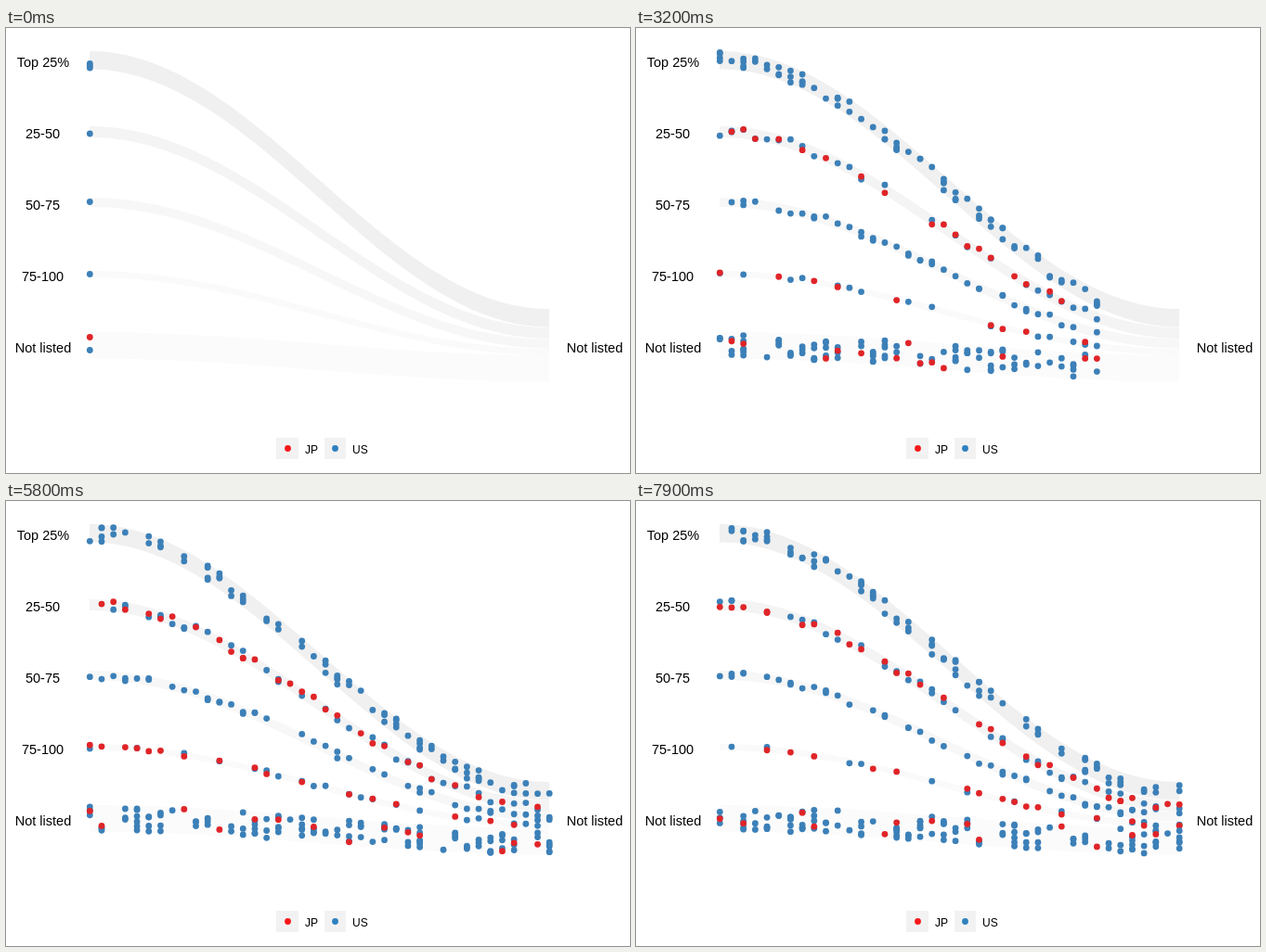
An HTML page with a canvas that plays this animation: 672 px wide and 480 px high, repeating every 8000 ms.

```html
<!DOCTYPE html>
<html lang="en">
<head>
<meta charset="utf-8">
<title>Flow between groups</title>
<style>
  html, body { margin: 0; width: 100%; height: 100%; overflow: hidden; background: #fff; }
  canvas, svg { position: absolute; left: 0; top: 0; width: 672px; height: 480px; }
  text { font-family: "Liberation Sans", Arial, sans-serif; font-size: 14.5px; fill: #000; }
  .row { text-anchor: middle; }
  .key { font-size: 12px; }
</style>
</head>
<body>
<canvas id="stage" width="672" height="480"></canvas>
<svg viewBox="0 0 672 480">
  <text class="row" x="40" y="42">Top 25%</text>
  <text class="row" x="39.5" y="119">25-50</text>
  <text class="row" x="39.5" y="196">50-75</text>
  <text class="row" x="39.5" y="273">75-100</text>
  <text class="row" x="40" y="350">Not listed</text>
  <text class="row" x="634" y="350">Not listed</text>
  <rect x="291" y="442" width="24" height="23" fill="#f2f2f2"/>
  <rect x="343" y="442" width="23" height="23" fill="#f2f2f2"/>
  <circle cx="303.5" cy="453.5" r="3.4" fill="#f8181a"/>
  <circle cx="354.5" cy="453.5" r="3.4" fill="#2f80bf"/>
  <text class="key" x="322" y="459">JP</text>
  <text class="key" x="373" y="459">US</text>
</svg>
<script>
const ctx = document.getElementById('stage').getContext('2d');
const LEFT = 90.3, RIGHT = 585.2, LAST = 39;
const STEP = 100, STEPS = 80;
const RED = '#e02428', BLUE = '#3c80b8';

// y, end: top edge at the left and right; h: thickness
// us, jp: mean number of new dots per step; first: heights of the opening blue dots
const bands = [
  { y: 25, end: 303, h: 19.5, fill: '#f0f0f0', us: 2.1, jp: 0, first: [38.5, 41, 43] },
  { y: 106, end: 323, h: 12, fill: '#f4f4f4', us: 0.8, jp: 0.65, first: [114] },
  { y: 183, end: 335.5, h: 10, fill: '#f7f7f7', us: 1.2, jp: 0, first: [187.5] },
  { y: 262, end: 346, h: 7, fill: '#fafafa', us: 0.4, jp: 0.33, first: [265.5] },
  { y: 328, end: 353, h: 28.5, fill: '#fbfbfb', us: 3, jp: 0.37, first: [347.5] }
];

function randomFrom(seed) {
  return () => {
    seed = (seed + 0x6D2B79F5) | 0;
    let v = Math.imul(seed ^ (seed >>> 15), 1 | seed);
    v = (v + Math.imul(v ^ (v >>> 7), 61 | v)) ^ v;
    return ((v ^ (v >>> 14)) >>> 0) / 4294967296;
  };
}

const ease = t => (1 - Math.cos(Math.PI * t)) / 2;
const rand = randomFrom(29);

// whole number between 0 and about twice the mean
const count = mean => Math.floor(2 * mean * rand() + rand());

function makeDots() {
  const dots = [];
  const add = (band, birth, color, y) =>
    dots.push({ birth, color, y, drop: band.end - band.y });
  const spawn = (band, birth, color, mean) => {
    for (let n = count(mean); n > 0; n--)
      add(band, birth, color, band.y + 1 + rand() * (band.h - 2));
  };
  for (const band of bands) {
    band.first.forEach(y => add(band, 0, BLUE, y));
    for (let s = 1; s < STEPS; s++) {
      spawn(band, s, BLUE, band.us);
      spawn(band, s, RED, band.jp);
    }
  }
  add(bands[4], 0, RED, 333.5);
  return dots;
}

function drawBand({ y, end, h, fill }) {
  const point = (i, dy) =>
    ctx.lineTo(90 + 495 * i / 100, y + dy + (end - y) * ease(i / 100));
  ctx.fillStyle = fill;
  ctx.beginPath();
  for (let i = 0; i <= 100; i++) point(i, 0);
  for (let i = 100; i >= 0; i--) point(i, h);
  ctx.fill();
}

function drawDot(dot, step) {
  const age = step - dot.birth;
  if (age < 0 || age > LAST) return;
  const t = age / LAST;
  ctx.fillStyle = dot.color;
  ctx.beginPath();
  ctx.arc(LEFT + (RIGHT - LEFT) * t, dot.y + dot.drop * ease(t), 3.4, 0, 2 * Math.PI);
  ctx.fill();
}

const dots = makeDots();
const start = performance.now();

function draw(now) {
  const step = Math.floor(Math.max(0, now - start) / STEP) % STEPS;
  ctx.clearRect(0, 0, 672, 480);
  bands.forEach(drawBand);
  dots.forEach(dot => drawDot(dot, step));
  requestAnimationFrame(draw);
}
draw(start);
</script>
</body>
</html>
```
